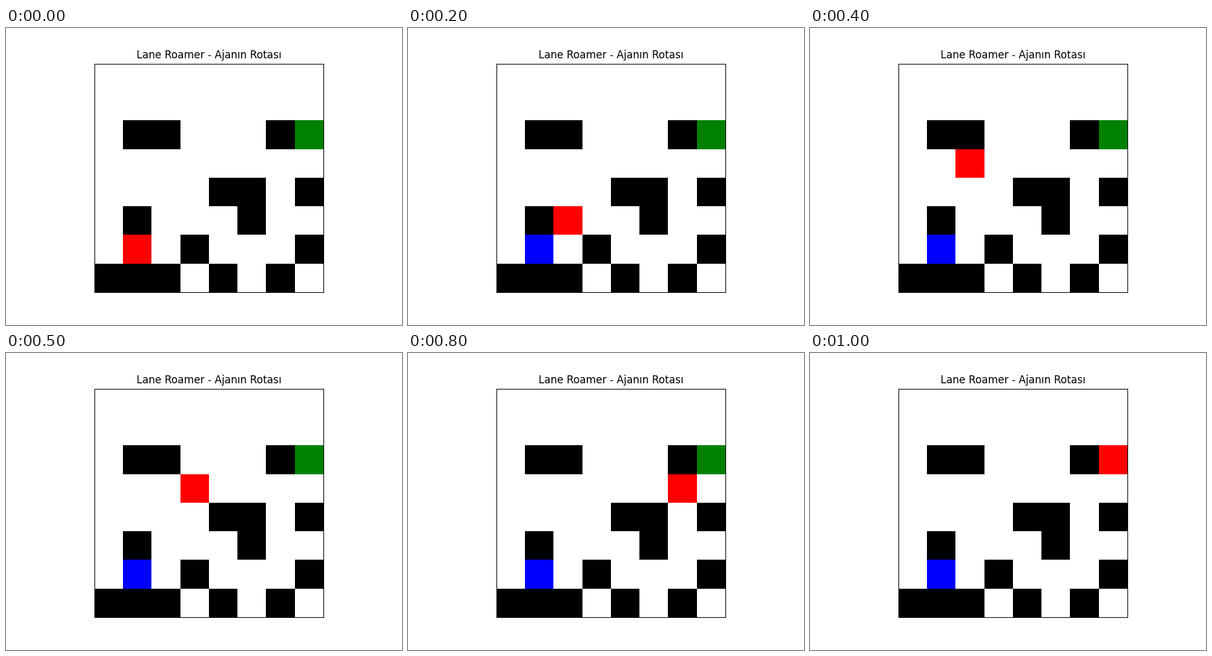
A matplotlib script for the animation above (1.1 s loop, 640 px wide and 480 px high).

```python
import numpy as np
import matplotlib.pyplot as plt
from matplotlib.animation import FuncAnimation

WHITE, BLACK = (255, 255, 255), (0, 0, 0)
RED, GREEN, BLUE = (255, 0, 0), (0, 128, 0), (0, 0, 255)

MAZE = [
    "........",
    "........",
    ".##...#.",
    "........",
    "....##.#",
    ".#...#..",
    "...#...#",
    "###.#.#.",
]
START, GOAL = (6, 1), (2, 7)
STEPS = {"U": (-1, 0), "R": (0, 1)}
MOVES = "RUUURRRRRU"

# Cells visited by the agent, one per frame
path = [START]
for move in MOVES:
    (row, col), (dr, dc) = path[-1], STEPS[move]
    path.append((row + dr, col + dc))

base = np.array([[BLACK if c == "#" else WHITE for c in line] for line in MAZE],
                dtype=np.uint8)
base[START] = BLUE
base[GOAL] = GREEN


def grid_at(i):
    grid = base.copy()
    grid[path[i]] = RED
    return grid


plt.rcParams["font.family"] = "DejaVu Sans"
fig, ax = plt.subplots(figsize=(6.4, 4.8), dpi=100)
image = ax.imshow(grid_at(0), interpolation="nearest")
ax.set_xticks([])
ax.set_yticks([])
ax.set_title("Lane Roamer - Ajanın Rotası", fontsize=12)


def update(i):
    image.set_data(grid_at(i))
    return [image]


anim = FuncAnimation(fig, update, frames=len(path), interval=100,
                     repeat=True, repeat_delay=0, blit=False)
plt.show()
```
